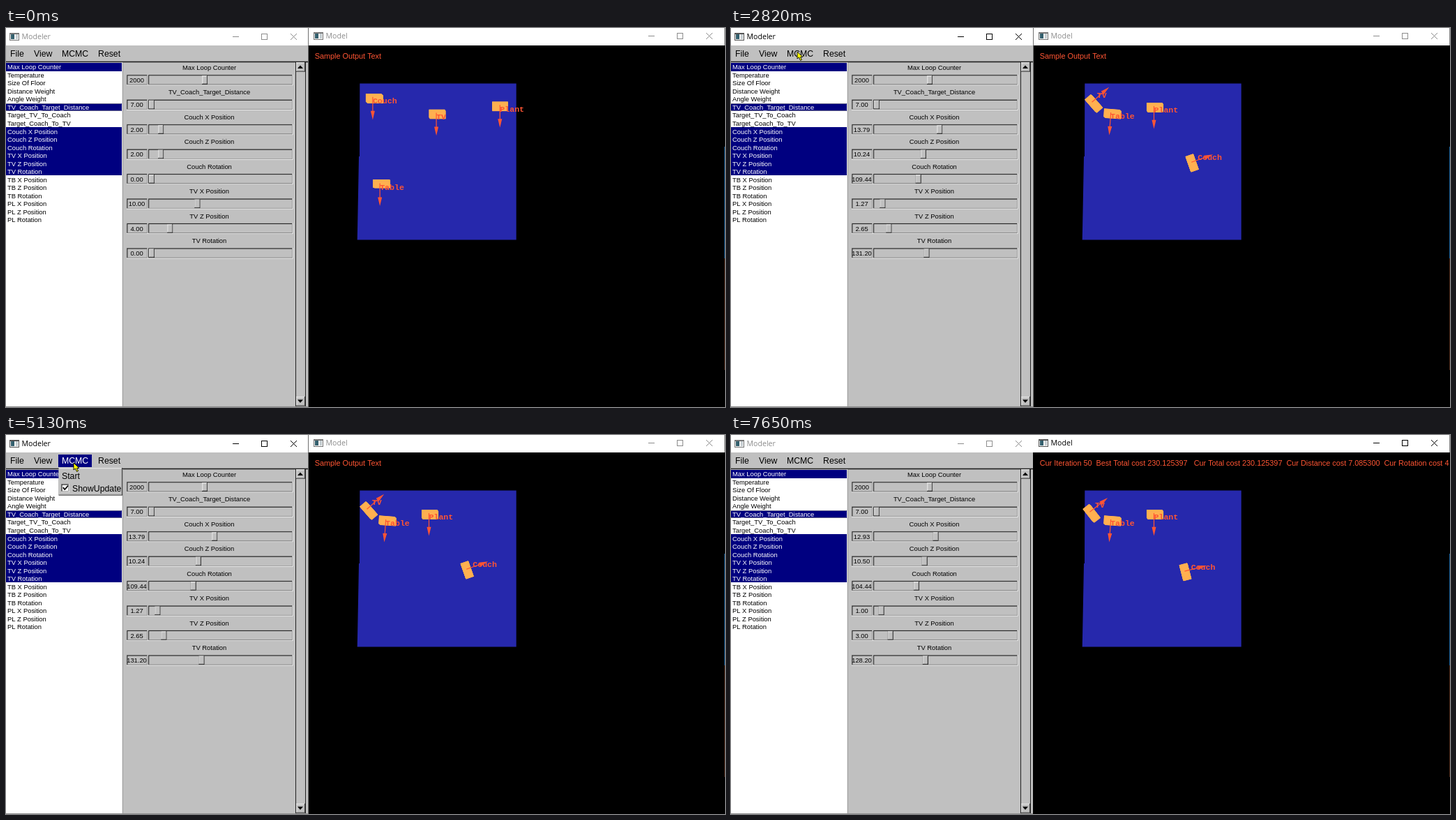
Write an HTML page with a canvas that moves like this. It is 1031 px wide and 543 px high and loops after 8000 ms.

```html
<!DOCTYPE html>
<html lang="en">
<head>
<meta charset="utf-8">
<title>Modeler</title>
<style>
html, body { margin: 0; width: 100%; height: 100%; overflow: hidden; background: #000; }
canvas { display: block; }
</style>
</head>
<body>
<canvas id="stage" width="1031" height="543"></canvas>
<script>
const LOOP = 8000;
const ctx = document.getElementById('stage').getContext('2d');

const SANS = '"Liberation Sans", Arial, sans-serif';
const TITLE = '10.6px "Open Sans", "Noto Sans", sans-serif';
const SMALL = '9.4px ' + SANS;
const MENU = '12.3px ' + SANS;
const OUTPUT = '10.87px ' + SANS;
const TAG = 'bold 11.6px "Liberation Mono", monospace';

const GRAY = '#c0c0c0', NAVY = '#000080', ORANGE = '#ffb050', RED = '#ff5533';
const BORDER = .77, ROW = 11.53, SLOT = 35.46;

const PARAMS = ['Max Loop Counter', 'Temperature', 'Size Of Floor', 'Distance Weight',
  'Angle Weight', 'TV_Coach_Target_Distance', 'Target_TV_To_Coach', 'Target_Coach_To_TV',
  'Couch X Position', 'Couch Z Position', 'Couch Rotation',
  'TV X Position', 'TV Z Position', 'TV Rotation',
  'TB X Position', 'TB Z Position', 'TB Rotation',
  'PL X Position', 'PL Z Position', 'PL Rotation'];
const SELECTED = [0, 5, 8, 9, 10, 11, 12, 13];
const MENUS = [['File', 6], ['View', 40], ['MCMC', 80], ['Reset', 132]];

// Poses: x, z, rotation in degrees
const POSES = [
  { Couch: [2, 2, 0], TV: [10, 4, 0], Table: [2.9, 12.9, 0], Plant: [18, 3, 0] },
  { Couch: [13.79, 10.24, 109.44], TV: [1.27, 2.65, 131.2], Table: [3.65, 3.95, -4], Plant: [9.07, 3.15, 0] },
  { Couch: [12.93, 10.5, 104.44], TV: [1, 3, 128.2], Table: [3.65, 3.95, -4], Plant: [9.07, 3.15, 0] }
];

const PATH = [
  [200, 768, 474], [400, 560, 300], [620, 300, 90], [780, 145, 20], [950, 133, 32],
  [2400, 133, 32], [2600, 118, 51], [2820, 95, 34],
  [3280, 95, 34], [3630, 97, 54],
  [4490, 97, 54], [4750, 97, 40],
  [5260, 97, 40], [5470, 97, 54],
  [6330, 97, 54], [6660, 560, 600]
];
const PRESSES = [[880, 1340], [3090, 3360], [4030, 4360], [4820, 5130], [6000, 6330]];
const POPUPS = [[3160, 4160], [4920, 6130]];

const within = (t, spans) => spans.some(([a, b]) => t >= a && t < b);

function rect(x, y, w, h, color) {
  ctx.fillStyle = color;
  ctx.fillRect(x, y, w, h);
}

function text(s, x, y, font, color, align = 'left') {
  ctx.font = font;
  ctx.fillStyle = color;
  ctx.textAlign = align;
  ctx.fillText(s, x, y);
}

function poly(points, fill) {
  ctx.beginPath();
  points.forEach(([x, y]) => ctx.lineTo(x, y));
  ctx.closePath();
  ctx.fillStyle = fill;
  ctx.fill();
}

function line(points, color, width = 1) {
  ctx.beginPath();
  points.forEach(([x, y], i) => i % 2 ? ctx.lineTo(x, y) : ctx.moveTo(x, y));
  ctx.strokeStyle = color;
  ctx.lineWidth = width;
  ctx.stroke();
}

// Two-step bevel: each ring has a top-left and a bottom-right colour
function bevel(x, y, w, h, rings, fill) {
  for (const [lit, shade] of rings) {
    rect(x, y, w, h, shade);
    rect(x, y, w - BORDER, h - BORDER, lit);
    x += BORDER;
    y += BORDER;
    w -= 2 * BORDER;
    h -= 2 * BORDER;
  }
  rect(x, y, w, h, fill);
}

const raised = (x, y, w, h) => bevel(x, y, w, h, [['#fff', '#000'], ['#d8d8d8', '#808080']], GRAY);
const sunken = (x, y, w, h, fill = GRAY) =>
  bevel(x, y, w, h, [['#808080', '#fff'], ['#000', '#aaa']], fill);

function titleBar(x, y, right, h, name, active) {
  const ink = active ? '#000' : '#8c8c8c';
  rect(x, 0, right - x, h, '#fff');
  rect(x + 5, y - 5, 14, 11, active ? '#555' : '#777');
  rect(x + 6, y - 3, 12, 8, '#f4f4f4');
  rect(x + 7, y - 3, 5, 7, '#34606e');
  rect(x + 14, y - 3, 3, 7, '#c4ccd0');
  text(name, x + 22.5, y + 4.3, TITLE, ink);
}

function titleButtons(x, y, active) {
  const ink = active ? '#000' : '#8c8c8c';
  line([[x, y + .5], [x + 9, y + .5]], ink);
  ctx.strokeRect(x + 41.5, y - 3.5, 8, 8);
  line([[x + 83, y - 4], [x + 92, y + 5], [x + 92, y - 4], [x + 83, y + 5]], ink);
}

function menuBar(t, popup) {
  rect(0, 25, 433, 23, GRAY);
  for (const [name, x] of MENUS) {
    const lit = name === 'MCMC' ? popup : name === 'Reset' && t >= 1220 && t < 2130;
    if (lit) rect(x - 5, 28, name === 'MCMC' ? 48 : 43, 18, NAVY);
    text(name, x, 41.4, MENU, lit ? '#fff' : '#000');
  }
}

function list(t) {
  rect(0, 49, 167, 493, '#fff');
  const count = t >= 1150 && t < 1220 ? 3 : t >= 1220 && t < 1280 ? 9 : PARAMS.length;
  const edge = i => Math.round(50 + ROW * i);
  PARAMS.slice(0, count).forEach((name, i) => {
    const on = SELECTED.includes(i), top = edge(i), bottom = edge(i + 1);
    if (on) rect(0, top, 166, bottom - top, NAVY);
    if (i === 5) {
      ctx.setLineDash([1, 1]);
      line([[0, top + .5], [166, top + .5], [0, bottom - .5], [166, bottom - .5]], '#c8c890');
      ctx.setLineDash([]);
    }
    text(name, 2, 59.3 + ROW * i, SMALL, on ? '#fff' : '#000');
  });
  rect(0, 47.7, 433, 1.6, '#202020');
  rect(166, 49, 1, 493, '#e8e8e8');
  rect(167, 49, 1, 493, '#a0a0a0');
}

function slider(i, name, value, ratio) {
  const y = 66.7 + SLOT * i;
  text(name, 291.5, 60 + SLOT * i, SMALL, '#000', 'center');
  sunken(172.8, y, 30.8, 15.5);
  text(value, 187.5, y + 11.2, SMALL, '#000', 'center');
  sunken(203.6, y, 208, 15.5);
  raised(205 + 196 * ratio, y + 1.5, 8, 12.5);
}

function sliders(pose) {
  slider(0, PARAMS[0], '2000', 1900 / 4900);
  slider(1, PARAMS[5], '7.00', 0);
  ['Couch', 'TV'].forEach((key, k) => pose[key].forEach((v, j) =>
    slider(2 + k * 3 + j, PARAMS[8 + k * 3 + j], v.toFixed(2), v / (j === 2 ? 360 : 30))));
}

function scrollBar() {
  rect(415, 49, 1, 493, '#202020');
  raised(416, 49, 13, 13.5);
  raised(416, 528, 13, 13.5);
  poly([[418, 58], [426, 58], [422, 53.5]], '#000');
  poly([[418, 532.5], [426, 532.5], [422, 537]], '#000');
  rect(429, 49, 1, 493, '#202020');
}

function popupMenu(hot) {
  raised(75.5, 47, 91.5, 39.5);
  if (hot) rect(78, 50, 86, 17, NAVY);
  text('Start', 80, 62.7, MENU, hot ? '#fff' : '#000');
  sunken(79, 70, 12, 12, '#fff');
  line([[82, 75], [84.3, 78.5], [84, 78.5], [89, 72.5]], '#000', 1.8);
  text('ShowUpdate', 95, 80.5, MENU, '#000');
}

function furniture(name, [px, pz, rot]) {
  const cx = 505.9 + 11.26 * px, cy = 78.7 + 11.2 * pz;
  const dx = .0125 * (cx - 732), dy = .0125 * (cy - 284);
  const a = rot * Math.PI / 180;
  for (let k = -.5; k <= .5; k += .125) {
    ctx.save();
    ctx.translate(cx + dx * k, cy + dy * k);
    ctx.rotate(-a);
    rect(-11.3, -5.8, 22.6, 11.6, ORANGE);
    ctx.restore();
  }
  const ox = cx + dx, oy = cy + dy, sx = Math.sin(a), sy = Math.cos(a);
  const at = (d, side) => [ox + sx * d + sy * side, oy + sy * d - sx * side];
  line([at(0, 0), at(21, 0)], RED, 1.2);
  poly([at(20, -3), at(20, 3), at(32.7, 0)], RED);
  const [lx, ly] = at(9.5, 0);
  text(name, lx, ly, TAG, RED);
}

function modelWindow(t, pose) {
  const active = t >= 6400, left = active ? 433 : 434;
  rect(left, 0, 598, 543, '#000');
  titleBar(436, 11, 1030, 25, 'Model', active);
  rect(left, 0, 3, 25, '#fff');
  titleButtons(921, 11, active);
  rect(1030, 0, 1, 25, '#888');
  rect(1030, 170, 1, 160, '#1a5f96');
  rect(1030, 330, 1, 160, '#4a2818');

  poly([[507.3, 79.6], [731.7, 79.6], [731.7, 303.6], [503.7, 303.6],
    [504, 290], [506, 184], [507, 184]], '#2628ac');
  for (const name in pose) furniture(name, pose[name]);

  ctx.save();
  ctx.beginPath();
  ctx.rect(434, 25, 596, 518);
  ctx.clip();
  const status = t < 7590 ? 'Sample Output Text'
    : 'Cur Iteration 50  Best Total cost 230.125397   Cur Total cost 230.125397' +
      '  Cur Distance cost 7.085300  Cur Rotation cost 41.250000';
  text(status, 442.7, 43.7, OUTPUT, RED);
  ctx.restore();
}

function modelerWindow(t, pose, popup, hot) {
  const active = t >= 1150 && t < 6400;
  rect(0, 0, 434, 543, GRAY);
  titleBar(0, 12, 433, 25, 'Modeler', active);
  titleButtons(325, 12, active);
  menuBar(t, popup);
  list(t);
  sliders(pose);
  scrollBar();
  rect(0, 542, 433, 1, '#909090');
  rect(433, 0, 1, 543, '#707070');
  if (popup) popupMenu(hot);
}

function cursorAt(t) {
  const i = PATH.findIndex(p => p[0] > t);
  if (i < 1) return null;
  const [t0, x0, y0] = PATH[i - 1], [t1, x1, y1] = PATH[i];
  const k = (t - t0) / (t1 - t0);
  return [x0 + (x1 - x0) * k, y0 + (y1 - y0) * k];
}

function cursor([x, y], pressed) {
  if (pressed) {
    ctx.beginPath();
    ctx.arc(x + 2, y + 1, 10.8, 0, 7);
    ctx.fillStyle = 'rgba(255,238,0,.7)';
    ctx.fill();
  }
  poly([[0, 0], [0, 10], [2.5, 8], [4.5, 12.5], [6.5, 11.5], [4.6, 7.5], [8, 7.5]]
    .map(([a, b]) => [x + a, y + b]), '#ffff00');
  ctx.strokeStyle = '#000';
  ctx.lineWidth = .9;
  ctx.stroke();
}

function draw(t) {
  const pose = POSES[t < 2020 ? 0 : t < 7590 ? 1 : 2];
  const popup = within(t, POPUPS);
  const tip = cursorAt(t);
  modelerWindow(t, pose, popup, tip && tip[1] > 49);
  modelWindow(t, pose);
  if (tip) cursor(tip, within(t, PRESSES));
}

const start = performance.now();
function tick() {
  draw((performance.now() - start) % LOOP);
  requestAnimationFrame(tick);
}
tick();
</script>
</body>
</html>
```
